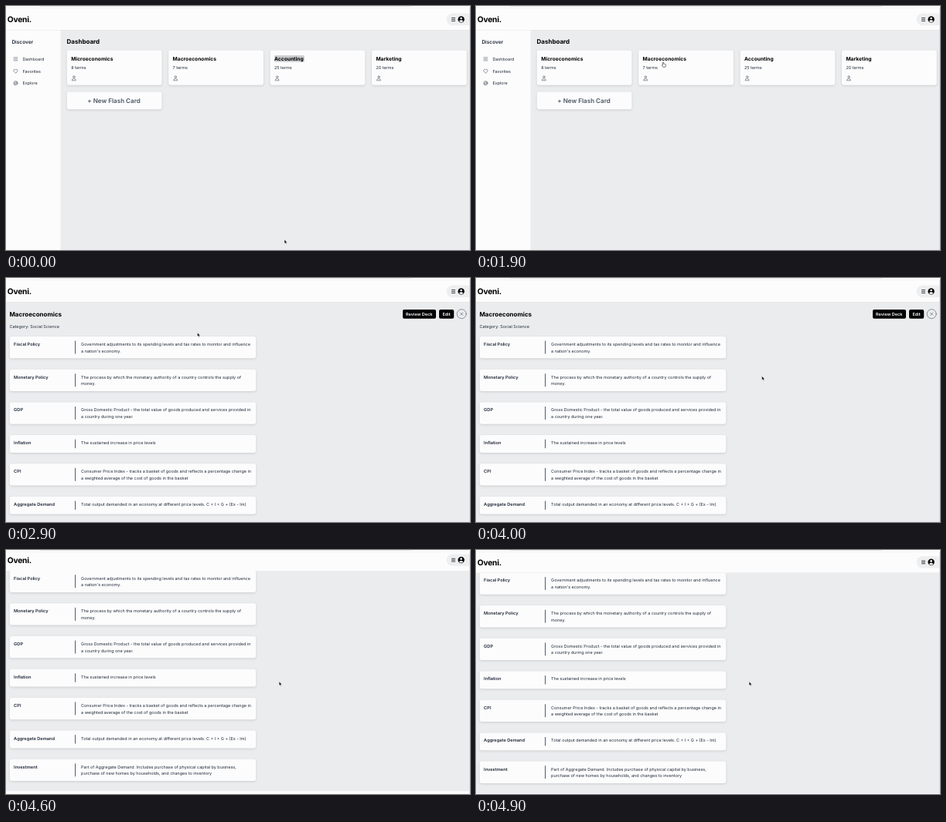
These frames come from a looping animation (600x317 px, 5000 ms). An HTML page:

```html
<!DOCTYPE html>
<html lang="en">
<head>
<meta charset="utf-8">
<title>Flash cards</title>
<style>
  html, body { margin: 0; width: 100%; height: 100%; overflow: hidden; background: #fcfcfd; }
  svg { display: block; width: 600px; height: 317px; }
  text { font: 400 5.45px Inter, sans-serif; fill: #1f2937; text-rendering: geometricPrecision; white-space: pre; }
  .brand { font-size: 10.3px; font-weight: 700; letter-spacing: -.025em; fill: #000; }
  .title { font-size: 8px; font-weight: 700; fill: #000; }
  .name { font-size: 6.67px; font-weight: 700; fill: #000; }
  .side { font-size: 6.5px; font-weight: 600; fill: #1f2937; }
  .new { font-size: 8.05px; font-weight: 600; fill: #4b5563; }
  .term { font-size: 5.68px; font-weight: 600; }
  .button { font-size: 5.55px; font-weight: 600; fill: #fff; }
  .card { fill: #fcfcfd; filter: drop-shadow(0 1.6px 1.8px rgba(0, 0, 0, .13)); }
  .line { fill: none; stroke: #4b5563; stroke-width: .6; stroke-linecap: round; stroke-linejoin: round; }
</style>
</head>
<body>
<svg viewBox="0 0 600 317">
  <g id="page">
    <rect y="28" width="600" height="289.7" fill="#ebecee"/>
    <g id="dashboard"></g>
    <g id="deck"></g>
    <g id="header"></g>
  </g>
  <g id="browser"></g>
  <path id="arrow" d="M0 0V5L1.2 4L2 5.7L2.9 5.3L2.1 3.7H3.6Z" fill="#000" stroke="#fff" stroke-width=".45"/>
  <path id="hand" d="M-.6 .4Q0-.4 .6 .4V2Q1.2 1.7 1.5 2.2Q2.2 1.9 2.5 2.5Q3.3 2.3 3.3 3.2V4.4L2.7 6.2H-.2L-1.7 3.8Q-1.6 3-.6 3.7Z" fill="#fff" stroke="#222" stroke-width=".6" stroke-linejoin="round"/>
</svg>
<script>
const LOOP = 5000, STEP = 100;
const el = id => document.getElementById(id);
const rect = (x, y, w, h, fill, r = 0) => `<rect x="${x}" y="${y}" width="${w}" height="${h}" rx="${r}" fill="${fill}"/>`;
const card = (x, y, w, h) => `<rect class="card" x="${x}" y="${y}" width="${w}" height="${h}" rx="3"/>`;
const text = (x, y, s, type = '') => `<text x="${x}" y="${y}" class="${type}">${s}</text>`;
const line = d => `<path class="line" d="${d}"/>`;
const ring = (x, y, r) => `<circle class="line" cx="${x}" cy="${y}" r="${r}"/>`;

function buildDashboard() {
  const subjects = [['Microeconomics', 8], ['Macroeconomics', 7], ['Accounting', 25], ['Marketing', 20]];
  const cards = subjects.map(([name, count], i) => {
    const x = 78.8 + i * 131.4;
    const mark = name === 'Accounting' ? `<rect id="selection" x="${x + 5.6}" y="64.2" width="38.6" height="8.4" fill="#c9cacc"/>` : '';
    return card(x, 57.4, 122.7, 45.4) + mark +
      text(x + 5.4, 70.7, name, 'name') + text(x + 5.4, 82.3, count + ' terms') +
      ring(x + 9, 92.1, 1.25) + line(`M${x + 6.5} 96.4Q${x + 6.6} 94.2 ${x + 9} 94.2T${x + 11.5} 96.4Z`);
  });
  return rect(0, 30, 70.5, 287.7, '#fcfcfd') + text(7.4, 49.3, 'Discover', 'side') +
    line('M10 66.9h4.8M10 68.9h4.8M10 70.9h4.8') +
    line('M12.4 87.2L10 84.8C8.9 83.2 11 81.2 12.4 83C13.8 81.2 15.9 83.2 14.8 84.8Z') +
    ring(12.4, 100.2, 2.6) + line('M13.7 98.9L11.5 99.4L11.1 101.5L13.2 101Z') +
    ['Dashboard', 'Favorites', 'Explore'].map((s, i) => text(21.4, 71 + i * 15.7, s)).join('') +
    text(78.5, 49.1, 'Dashboard', 'title') + cards.join('') +
    card(78.8, 111.4, 122.7, 22.8) + text(105.3, 126, '+ New Flash Card', 'new');
}

function buildDeck() {
  const terms = [
    ['Fiscal Policy', 'Government adjustments to its spending levels and tax rates to monitor and influence', "a nation's economy."],
    ['Monetary Policy', 'The process by which the monetary authority of a country controls the supply of', 'money.'],
    ['GDP', 'Gross Domestic Product - the total value of goods produced and services provided in', 'a country during one year.'],
    ['Inflation', 'The sustained increase in price levels'],
    ['CPI', 'Consumer Price Index - tracks a basket of goods and reflects a percentage change in', 'a weighted average of the cost of goods in the basket'],
    ['Aggregate Demand', 'Total output demanded in an economy at different price levels. C + I + G + (Ex - Im)'],
    ['Investment', 'Part of Aggregate Demand. Includes purchase of physical capital by business,', 'purchase of new homes by households, and changes to inventory']
  ];
  let y = 76;
  const rows = terms.map(([term, ...lines]) => {
    const height = lines.length > 1 ? 28.3 : 22.8;
    const row = card(4.8, y, 318.4, height) + text(10.1, y + 12, term, 'term') +
      rect(89.1, y + 5.6, 1, height - 11.4, '#4b5563') +
      lines.map((s, i) => text(97.1, y + 12 + i * 8.65, s)).join('');
    y += height + 14.4;
    return row;
  });
  return text(4.4, 49.8, 'Macroeconomics', 'title') + text(4.5, 65.3, 'Category: Social Science') +
    rect(513, 40.9, 43, 11.8, '#000', 2) + text(517, 48.8, 'Review Deck', 'button') +
    rect(560, 40.9, 19.2, 11.8, '#000', 2) + text(564.4, 48.8, 'Edit', 'button') +
    ring(589.2, 46.7, 6) + line('M587.6 45.1l3.2 3.2m0-3.2l-3.2 3.2') + rows.join('');
}

el('dashboard').innerHTML = buildDashboard();
el('deck').innerHTML = buildDeck();
el('header').innerHTML =
  `<rect y="-10" width="600" height="41.4" fill="#fcfcfd" style="filter:drop-shadow(0 .5px .7px rgba(0,0,0,.2))"/>` +
  text(1.8, 21.4, 'Oveni.', 'brand') + rect(569.6, 9.6, 34, 15.6, '#eeeff0', 7.8) +
  [15.2, 17.1, 19].map(y => rect(576, y, 5, .8, '#222')).join('') +
  `<circle cx="588.6" cy="17.4" r="4.2"/><circle cx="588.6" cy="16" r="1.35" fill="#fff"/>` +
  `<path d="M585.9 19.8Q588.6 16.9 591.3 19.8Q588.6 22.2 585.9 19.8Z" fill="#fff"/>`;
el('browser').innerHTML = rect(0, 0, 600, 2.6, '#fcfcfd') + rect(44, 0, 482, .7, '#e3e4ea') +
  rect(0, 2.3, 600, .5, '#eeeeef') + rect(599.3, 3, .7, 314, '#d4d5d7');

// Keys are [time, ...values], joined by straight segments.
const pointer = [
  [0, 360, 303.5], [100, 360, 303.5], [200, 341, 266], [300, 285, 166], [400, 264.5, 132.5],
  [500, 264.5, 132.5], [700, 261, 111], [900, 250.5, 76], [1000, 249, 69.6], [1200, 249, 69.6],
  [1800, 241.9, 73.2], [2000, 242.3, 73], [2800, 242.3, 73], [2900, 247.5, 71], [3000, 285, 58],
  [3100, 335, 53.5], [3200, 371, 80], [3300, 377, 112], [3400, 370.5, 126.5], [3900, 370.5, 126.5],
  [4000, 369.7, 127.6], [4100, 360, 150], [4200, 353.2, 171]
];
const scrolling = [[4300, 0], [4400, 22], [4500, 45]];
const bounce = [[4500, 0], [4600, 4.4], [4700, 5.9], [4800, 3.6], [4900, 1.6]];

function sample(keys, t) {
  const next = keys.findIndex(k => k[0] > t);
  if (next === 0) return keys[0].slice(1);
  if (next < 0) return keys[keys.length - 1].slice(1);
  const a = keys[next - 1], b = keys[next], p = (t - a[0]) / (b[0] - a[0]);
  return a.slice(1).map((v, i) => v + (b[i + 1] - v) * p);
}

const show = (id, on) => { el(id).style.display = on ? '' : 'none'; };
const move = (id, x, y) => el(id).setAttribute('transform', `translate(${x} ${y})`);

function draw(now) {
  const t = Math.floor((now % LOOP) / STEP) * STEP;
  const [x, y] = sample(pointer, t);
  const onDeck = t >= 2000, onCard = t >= 800 && !onDeck;
  show('dashboard', !onDeck);
  show('deck', onDeck);
  show('selection', t < 1700);
  show('hand', onCard);
  show('arrow', !onCard);
  move('hand', x, y);
  move('arrow', x, y);
  move('deck', 0, -sample(scrolling, t)[0]);
  move('page', 0, -sample(bounce, t)[0]);
}

const start = performance.now();
function tick() {
  draw(performance.now() - start);
  requestAnimationFrame(tick);
}
tick();
</script>
</body>
</html>
```
